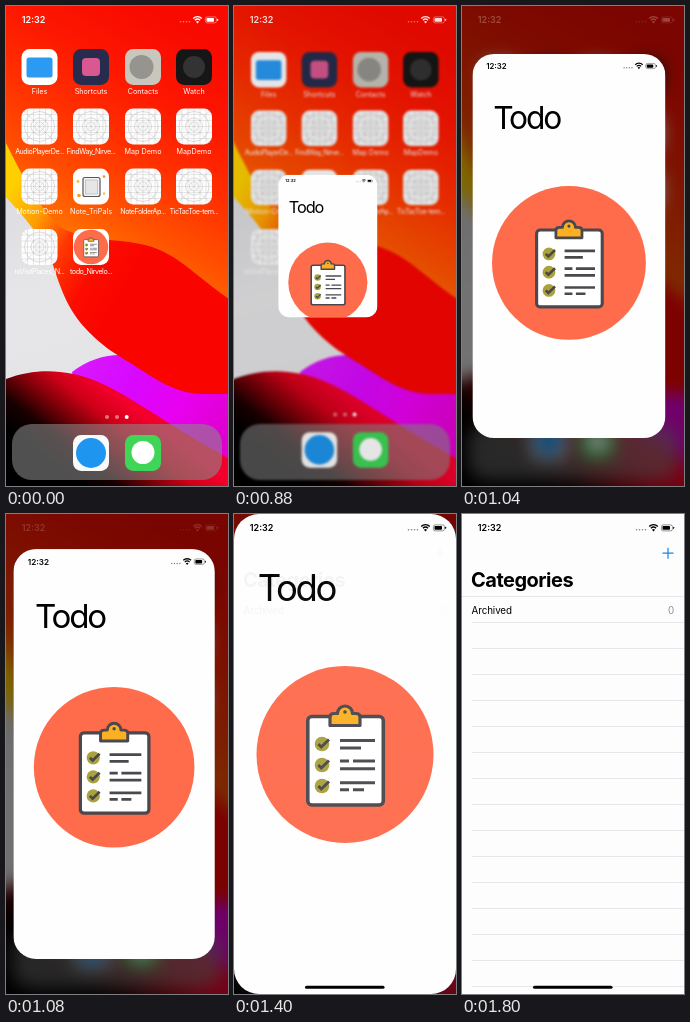
These frames come from a looping animation (222x480 px, 1.84 s). An HTML page:

```html
<!DOCTYPE html>
<html lang="en">
<head>
<meta charset="utf-8">
<title>App launch</title>
<style>
  html, body { margin: 0; width: 100%; height: 100%; overflow: hidden; background: #000; }
  svg { display: block; width: 100vw; height: 100vh; }
  text { font-family: Inter, "Liberation Sans", sans-serif; }
  .label { font-size: 7.2px; fill: #fff; text-anchor: middle; }
  .tight { letter-spacing: -.48px; }
  .time { font-size: 9px; font-weight: 600; }
</style>
</head>
<body>
<svg id="stage" viewBox="0 0 222 480"></svg>
<script>
const LOOP = 1840, STEP = 40, W = 222, H = 480, ICON = 36;
const COLS = [33.5, 85, 137, 188], ROWS = [61, 120.5, 180.5, 241];

const rect = (x, y, w, h, fill, r = 0, more = '') =>
  `<rect x="${x}" y="${y}" width="${w}" height="${h}" rx="${r}" fill="${fill}" ${more}/>`;
const circle = (x, y, r, fill, more = '') =>
  `<circle cx="${x}" cy="${y}" r="${r}" fill="${fill}" ${more}/>`;
const path = (d, fill, more = '') => `<path d="${d}" fill="${fill}" ${more}/>`;
const group = (id, inner) => `<g id="${id}">${inner}</g>`;
const gradient = (id, x1, y1, x2, y2, ...colors) =>
  `<linearGradient id="${id}" gradientUnits="userSpaceOnUse" x1="${x1}" y1="${y1}" x2="${x2}" y2="${y2}">` +
  colors.map((c, i) => `<stop offset="${i / (colors.length - 1)}" stop-color="${c}"/>`).join('') +
  '</linearGradient>';

const statusBar = color => `
  <text class="time" x="15.8" y="17.2" fill="${color}">12:32</text>
  ${[174.5, 177.5, 180.5, 183.5].map(x => circle(x, 15.8, .8, color, 'opacity=".5"')).join('')}
  ${path('M187.2 12.4a6.2 6.2 0 0 1 8.6 0M188.9 14.3a3.8 3.8 0 0 1 5.2 0', 'none', `stroke="${color}" stroke-width="1.4"`)}
  ${path('M190 15.7a2.3 2.3 0 0 1 3 0L191.5 17.5Z', color)}
  ${rect(199.4, 10.9, 11, 6, 'none', 1.8, `stroke="${color}" stroke-width=".7" stroke-opacity=".6"`)}
  ${rect(200.5, 12, 7.5, 3.8, color, .8)}${rect(211.2, 12.8, .9, 2.2, color, .4)}`;

// Back to front; the waves run past the stage so that blurring keeps its edges filled.
const wallpaper = () => `
  ${rect(-40, -40, 302, 560, 'url(#paper)')}
  ${path('M66 366C92 346 124 344 148 358C180 376 200 384 262 384V520H100Z', 'url(#violet)')}
  ${path('M-40 150C0 192 30 218 46 256C56 288 64 306 80 323C98 342 110 348 126 358C150 374 170 387 195 388H262V-40H-40Z', 'url(#lower)')}
  ${path('M-40 70C0 122 14 184 54 221C84 238 116 231 146 241C184 254 196 282 262 316V-40H-40Z', 'url(#upper)')}
  ${path('M-40 398C0 362 48 358 90 375C130 392 160 420 262 474V520H-40Z', 'url(#night)')}`;

const clipboard = () => {
  const ink = '#4a484c';
  const bars = [[226.5, 106, 141], [234, 106, 127], [247, 106, 115], [247, 119, 141],
                [254.7, 106, 141], [268.7, 106, 141], [275.8, 106, 115], [275.8, 119, 130]];
  return rect(73.8, 202.5, 75.5, 88.5, '#fff', 4, `stroke="${ink}" stroke-width="3.6"`) +
    path('M96 211.5V203Q96 199.5 100 199.5H103.5A7.5 7.5 0 0 1 118.5 199.5H122Q126 199.5 126 203V211.5Z',
      '#fbb023', `stroke="${ink}" stroke-width="3.2" stroke-linejoin="round"`) +
    circle(111, 198, 1.8, ink) +
    [230, 251, 272].map(y => circle(88, y, 7.3, '#aaa23c') +
      path(`M84.3 ${y}L87.3 ${y + 3}L95 ${y - 4.5}`, 'none', `stroke="${ink}" stroke-width="3"`)).join('') +
    bars.map(([y, a, b]) => path(`M${a} ${y}H${b}`, 'none', `stroke="${ink}" stroke-width="3"`)).join('');
};
const badge = () => circle(111, 240.4, 88.5, '#ff6c4c') + clipboard();

// Icon art is drawn around its own centre.
const tile = (fill, art = '') => rect(-18, -18, ICON, ICON, fill, 8.2) + art;
const blueprint = () => {
  const grid = [-12, -6, 0, 6, 12].map(k => `M${k}-18V18M-18 ${k}H18`).join('');
  const pen = 'stroke="#aaa" stroke-width=".4"';
  return tile('#fdfdfd', path(grid + 'M-16-16L16 16M16-16L-16 16', 'none', pen + ' opacity=".7"') +
    [4.5, 8.5, 15].map(r => circle(0, 0, r, 'none', pen)).join(''));
};
const noteIcon = () => tile('#fff',
  rect(-8, -9, 17, 19, '#f4f4f2', 2, 'stroke="#555" stroke-width="1.2"') +
  rect(-5.5, -6.5, 12, 14, '#e6e6e6', 0, 'stroke="#aaa" stroke-width=".6"') +
  circle(-13, -5, 1.4, '#f5b83d') + circle(-12, 9, 1.8, '#f0a020') +
  circle(13, -10, 1.3, '#f28a3c') + circle(13, 7, 1.2, '#f5c242'));
const todoIcon = () => tile('#fff', `<g transform="scale(.195) translate(-111 -240.4)">${badge()}</g>`);

const apps = [
  ['Files', tile('#fff', rect(-13, -9.5, 26, 20, '#2a9af3', 2.5))],
  ['Shortcuts', tile('#272c4f', rect(-9, -9, 18, 18, '#d8588f', 4))],
  ['Contacts', tile('#c9c6bd', circle(-1.5, 0, 12, '#96948e'))],
  ['Watch', tile('#161616', circle(0, 0, 11, '#333'))],
  ['AudioPlayerDe...'], ['FindWay_Nirve...'], ['Map Demo'], ['MapDemo'],
  ['Motion-Demo'], ['Note_TriPals', noteIcon()], ['NoteFolderAp...'], ['TicTacToe-tem...'],
  ['toVisitPlaces_N...'], ['todo_Nirvelo...', group('todo', todoIcon() + group('press', tile('#000')))]
];

const appGrid = () => apps.map(([name, art = blueprint()], i) => {
  const x = COLS[i % 4], y = ROWS[i >> 2];
  return `<g transform="translate(${x} ${y})">${art}
    <text class="label ${name.endsWith('...') ? 'tight' : ''}" y="27.3">${name}</text></g>`;
}).join('');

const dockIcons = () => `
  <g transform="translate(85 447)">${tile('#fafafa', circle(0, 0, 15, '#1e95ee'))}</g>
  <g transform="translate(137 447)">${tile('#3fd657', circle(0, -.5, 11.5, '#fff'))}</g>`;

const launchScreen = () => `
  ${statusBar('#000')}
  <text x="23.8" y="86.7" font-size="36.5" letter-spacing="-2.4">Todo</text>
  ${badge()}`;

const listScreen = () => `
  ${rect(0, 0, W, H, '#fdfdfd')}${statusBar('#000')}
  ${path('M200.5 39.2H211.5M206 33.7V44.7', 'none', 'stroke="#1687e0" stroke-width="1.2"')}
  <text x="9" y="73.3" font-size="20" font-weight="700" letter-spacing="-.5">Categories</text>
  <text x="9.6" y="99.7" font-size="9.8" letter-spacing="-.1">Archived</text>
  <text x="212.3" y="99.7" font-size="9.8" fill="#8e8e93" text-anchor="end">0</text>
  ${Array.from({ length: 16 }, (_, i) =>
    path(`M${i ? 10 : 0} ${82.5 + i * 26}H${W}`, 'none', 'stroke="#e3e3e6" stroke-width=".8"')).join('')}`;

document.getElementById('stage').innerHTML = `
  <defs>
    ${gradient('paper', 0, 180, 60, 400, '#dcdcde', '#e6e6e8', '#e4e4e6')}
    ${gradient('lower', 0, 190, 130, 262, '#ffd000', '#ffa000', '#ff3800', '#fc0c00', '#fa0400')}
    ${gradient('upper', 40, 240, 170, 20, '#ff8200', '#ff5200', '#ff3000', '#fd1600', '#f80a00')}
    ${gradient('violet', 80, 350, 215, 430, '#d818ff', '#d808ff', '#e800f0', '#e000d0')}
    ${gradient('night', 92, 374, 34, 448, '#f4002c', '#d00018', '#780008', '#180000', '#000')}
    <clipPath id="mask"><rect id="maskRect"/></clipPath>
  </defs>
  ${group('home', wallpaper() + rect(6, 418, 210, 56, '#8a8a8a', 20, 'opacity=".58"') +
    group('icons', appGrid() + dockIcons() +
      [101, 111, 120.7].map((x, i) => circle(x, 411, 2, '#fff', `opacity="${i < 2 ? .45 : 1}"`)).join('')))}
  ${group('dim', rect(0, 0, W, H, '#000'))}
  ${group('homeStatus', statusBar('#fff'))}
  <g id="card" clip-path="url(#mask)">
    ${rect(0, 0, W, H, '#fefefe')}
    ${launchScreen()}
    ${group('list', listScreen())}
  </g>
  ${group('homeBar', rect(71, 471.8, 79.5, 3, '#000', 1.5))}`;

const el = Object.fromEntries([...document.querySelectorAll('[id]')].map(e => [e.id, e]));
const set = (e, attrs) => { for (const k in attrs) e.setAttribute(k, attrs[k]); };
const show = (e, on) => { e.style.display = on ? '' : 'none'; };
const mix = (a, b, p) => a + (b - a) * p;

// Piecewise-linear value through [time, value] points.
const track = points => t => {
  const i = points.findIndex(p => p[0] > t);
  if (i === 0) return points[0][1];
  if (i < 0) return points[points.length - 1][1];
  const [[t0, a], [t1, b]] = [points[i - 1], points[i]];
  return mix(a, b, (t - t0) / (t1 - t0));
};
const widen = track([[880, .34], [920, .56], [960, .704], [1000, .784], [1040, .844], [1120, .935], [1200, .984], [1280, .996], [1400, 1]]);
const heighten = track([[880, .24], [920, .45], [960, .603], [1000, .704], [1040, .784], [1120, .9], [1200, .977], [1280, .994], [1400, 1]]);
const blur = track([[840, 0], [960, 3], [1040, 8], [1200, 11]]);
const shade = track([[840, 0], [960, .3], [1040, .5], [1200, .54]]);
const shrink = track([[840, 1], [960, .955], [1040, .945]]);
const statusFade = track([[840, 1], [960, .55], [1040, .25], [1160, 0]]);
const listFade = track([[1399, 0], [1400, .04], [1480, .04], [1520, .14], [1600, .48], [1680, .82], [1760, .97], [1800, 1]]);

function draw(time) {
  const t = Math.floor(time % LOOP / STEP) * STEP;
  const open = t >= 880;

  el.home.style.filter = open ? `blur(${blur(t)}px)` : 'none';
  set(el.icons, { transform: `translate(111 240) scale(${shrink(t)}) translate(-111 -240)` });
  set(el.dim, { opacity: shade(t) });
  set(el.homeStatus, { opacity: statusFade(t) });
  set(el.press, { opacity: t >= 680 ? .46 : 0 });
  show(el.todo, !open);
  show(el.card, open);
  show(el.homeBar, t >= 1120);
  if (!open) return;

  const w = mix(ICON, W, widen(t)), h = mix(ICON, H, heighten(t));
  const x = mix(85, 111, widen(t)) - w / 2, y = 240 - h / 2;
  const scale = w / W;
  set(el.card, { transform: `translate(${x} ${y}) scale(${scale})` });
  set(el.maskRect, { width: W, height: h / scale, rx: t < 1600 ? 25 : 0 });
  set(el.list, { opacity: listFade(t) });
}

function frame() {
  draw(performance.now());
  requestAnimationFrame(frame);
}
frame();
</script>
</body>
</html>
```
